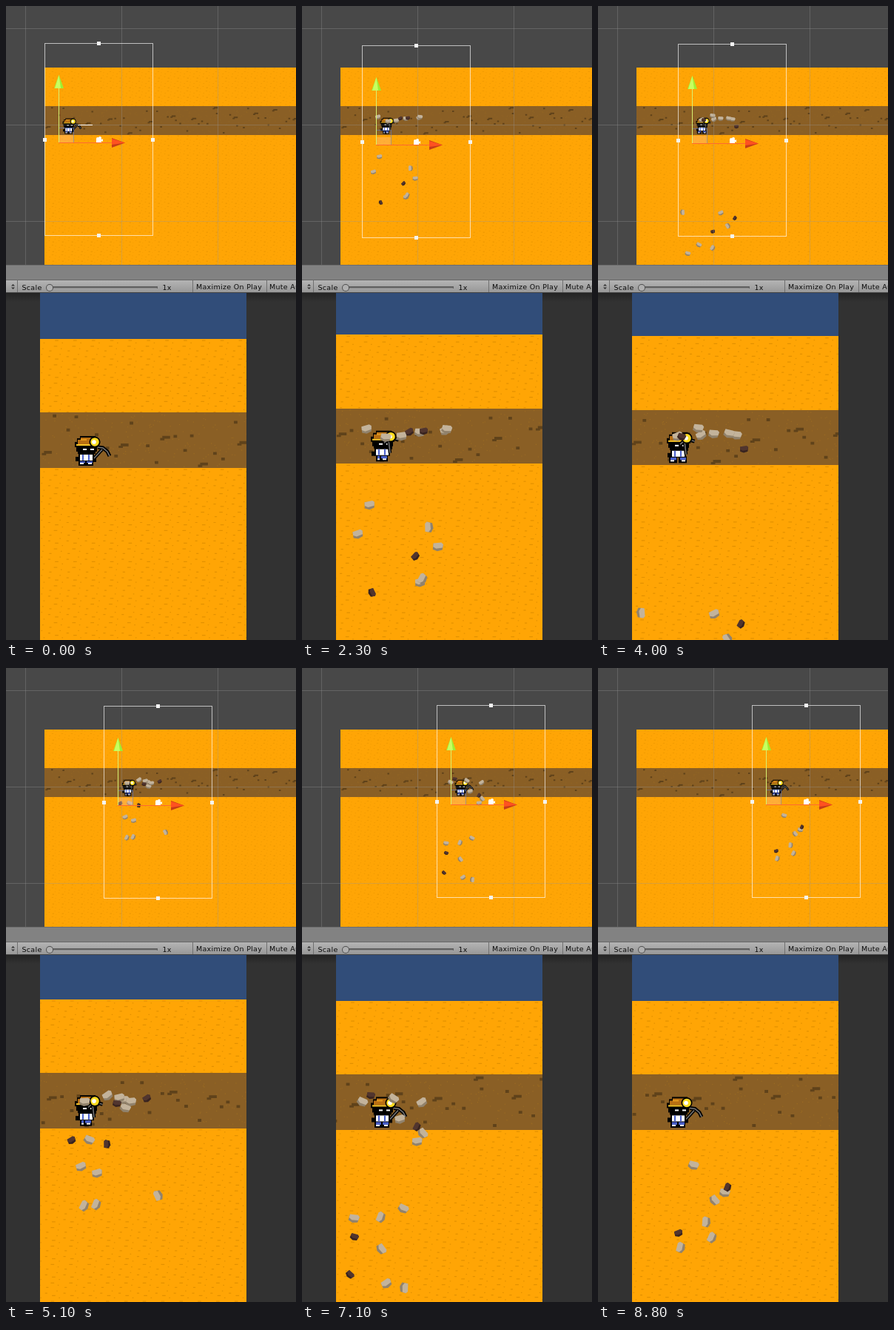
These frames come from a looping animation (392x855 px, 8900 ms). An HTML page with a canvas:

```html
<!DOCTYPE html>
<html>
<head>
<meta charset="utf-8">
<style>
html, body { margin: 0; width: 100%; height: 100%; overflow: hidden; background: #323232; }
canvas { display: block; }
</style>
</head>
<body>
<canvas id="stage" width="392" height="855"></canvas>
<script>
const ctx = document.getElementById('stage').getContext('2d');
const LOOP = 8900, FRAME = 100, ZOOM = 1.911, GRAVITY = 400;
const TILE = 13, LEFT = 52, TOP = 83, ROAD = 135, STEPS = 12;
const MOVING = 0.6; // share of each step spent walking, the rest is a pause

// time (s) and number of tiles walked
const pace = [[0, 0], [0.9, 0], [2.3, 2.14], [4, 4.18], [5.1, 6.1], [6.3, 8.1], [7.1, 9.85], [8.9, 12]];

let seed = 11;
const random = () => (seed = seed * 16807 % 2147483647) / 2147483647;
const between = (a, b) => a + (b - a) * random();

// Interpolates along the pace curve, in either direction
function follow(value, from, to) {
  const i = Math.max(1, pace.findIndex(p => p[from] > value));
  const a = pace[i - 1], b = pace[i];
  return a[to] + (b[to] - a[to]) * (value - a[from]) / (b[from] - a[from]);
}

function pose(t) {
  const phase = follow(t, 0, 1), step = Math.floor(phase), part = phase - step;
  const digging = t >= 0.9 && part < MOVING;
  return {
    digging,
    waiting: t < 0.9,
    x: LEFT + TILE * (step + Math.min(1, part / MOVING)),
    dip: digging ? 3 * Math.max(0, (7.3 - t) / 5) ** 1.1 : 0
  };
}

const pieces = [];
for (let step = 0; step < STEPS; step++) {
  for (let i = 0; i < 8; i++) {
    pieces.push({
      birth: follow(step, 1, 0) - 0.03,
      x: LEFT + step * TILE + between(28, 88), y: between(153, 162),
      vx: between(-30, 20), vy: between(-100, -20),
      angle: between(-0.5, 0.5), spin: between(-2, 2), dark: i > 5
    });
  }
}

const sandMarks = new Path2D(), spots = new Path2D(), speckles = new Path2D();
const px = TILE / 16;
for (let x = LEFT; x < 400; x += TILE)
  for (let y = TOP; y < 360; y += TILE)
    for (let i = 0; i < 7; i++)
      sandMarks.rect(x + (i * 5 + 3) % 16 * px, y + (i * 7 + 3) % 16 * px, (1 + i % 3) * px, px * 0.8);
for (let i = 0; i < 50; i++) {
  const x = LEFT + i * 7 + between(0, 5), y = ROAD + between(0, 36), wide = i % 4 == 0;
  spots.rect(x, y, wide ? 5.5 : 2.5, 2);
  if (wide) spots.rect(x - 1.5, y + 1.5, 3, 1.6);
}
for (let i = 0; i < 400; i++) speckles.rect(LEFT + random() * 340, ROAD + random() * 38, 0.6, 0.6);

function box(color, x, y, w, h) {
  ctx.fillStyle = color;
  ctx.fillRect(x, y, w, h);
}

function fill(color, path) {
  ctx.fillStyle = color;
  ctx.fill(path);
}

function shape(color, ...points) {
  ctx.fillStyle = color;
  ctx.beginPath();
  for (const [x, y] of points) ctx.lineTo(x, y);
  ctx.fill();
}

function line(color, width, ...points) {
  ctx.strokeStyle = color;
  ctx.lineWidth = width;
  ctx.beginPath();
  for (const [x, y] of points) ctx.lineTo(x, y);
  ctx.stroke();
}

function disc(color, x, y, r) {
  ctx.fillStyle = color;
  ctx.beginPath();
  ctx.arc(x, y, r, 0, 7);
  ctx.fill();
}

function shade(y, h, from, to) {
  const g = ctx.createLinearGradient(0, y, 0, y + h);
  g.addColorStop(0, from);
  g.addColorStop(1, to);
  box(g, 0, y, 392, h);
}

// Full-width layer whose edges land on whole pixels at any zoom
function layer(color, top, bottom) {
  const m = ctx.getTransform(), snap = y => (Math.round(y * m.d + m.f) - m.f) / m.d;
  box(color, LEFT, snap(top), 400, snap(bottom) - snap(top));
}

function pickaxe(raised) {
  ctx.save();
  ctx.translate(27, 31);
  if (raised) ctx.rotate(-0.85);
  const handle = [[0, 0], [11, -12]], head = [[5, -15], [12, -14], [18, -9], [21, -3]];
  line('#000', 4.5, ...handle);
  line('#000', 5, ...head);
  line('#777', 1.5, ...handle);
  line('#777', 1.5, ...head);
  ctx.restore();
}

function miner(t, { x, digging, waiting }) {
  const frame = Math.round(t * 10);
  const bob = waiting ? 1 - Math.cos(frame * 1.25) : 1.5;
  const stride = digging ? (frame % 4 < 2 ? 2 : -2) : 0;
  ctx.save();
  ctx.translate(x + 46 / ZOOM - 22 / ZOOM + 0.1 * 0 + 22 / ZOOM, 151);
  ctx.scale(1 / ZOOM, 1 / ZOOM);
  for (const [foot, toe] of [[7 - stride, -1], [16 + stride, 1]]) {
    box('#000', foot - 1, 32, 11, 9);
    box('#4a60cc', foot + 1, 33, 8, 4);
    box('#fff', foot + 2 + toe, 37, 5, 2);
  }
  ctx.translate(0, -bob);
  // torso and arms
  box('#000', 6, 23, 21, 12);
  box('#000', 2, 29, 5, 6);
  box('#000', 25, digging ? 18 : 28, 5, 8);
  box('#fff', 8, 26, 17, 8);
  for (const stripe of [11, 19]) box('#4a60cc', stripe, 26, 2, 8);
  // head and helmet, from wide to narrow
  box('#000', 3, 14, 28, 8);
  box('#000', 5, 20, 24, 5);
  box('#000', 1, 9, 32, 7);
  box('#000', 4, 4, 29, 8);
  box('#000', 8, 1, 21, 6);
  box('#b96f12', 5, 6, 21, 6);
  box('#b96f12', 9, 3, 16, 4);
  box('#e59a1c', 9, 5, 8, 2);
  box('#ffc928', 3, 12, 22, 2);
  for (const eye of [12, 22]) box('#fff', eye, 18, 5, 2);
  pickaxe(digging);
  disc('#000', 28, 9, 7.5);
  disc('#ffdc20', 28, 9, 5.8);
  disc('#fff', 27, 9, 2.8);
  ctx.restore();
}

function rock({ birth, x, y, vx, vy, angle, spin, dark }, t) {
  const d = t - birth;
  if (d < 0 || d > 1.6) return;
  ctx.save();
  ctx.translate(x + vx * d, y + vy * d + GRAVITY * d * d / 2);
  ctx.rotate(angle + spin * d);
  if (dark) ctx.scale(0.8, 0.8);
  shape(dark ? '#38231f' : '#91826c', [-3.5, -1.5], [3.5, -2], [3.4, 2], [0, 3.5], [-3.3, 2.6]);
  shape(dark ? '#51352e' : '#c3b39b', [-3.5, -1.7], [2, -3], [3.5, -2], [3.4, 0.5], [-1, 1.8], [-3.4, 0.8]);
  ctx.restore();
}

function world(t, player) {
  layer('#ffa505', TOP, 420);
  fill('#e39100', sandMarks);
  layer('#8a5f25', ROAD, 174);
  fill('#9b6b22', speckles);
  fill('#5f421a', spots);
  miner(t, player);
  for (const piece of pieces) rock(piece, t);
}

function clipped(x, y, w, h, paint) {
  ctx.save();
  ctx.beginPath();
  ctx.rect(x, y, w, h);
  ctx.clip();
  paint();
  ctx.restore();
}

function gizmos(player) {
  for (let i = 0; i < 3; i++) {
    box('rgba(150,150,150,.35)', 26 + i * 130, 0, 1, 349);
    box('rgba(150,150,150,.35)', 0, 30 + i * 130, 392, 1);
  }
  const x = Math.round(player.x), y = Math.floor(50 + player.dip);
  if (player.waiting) box('#fff', 97, 160, 20, 1);
  ctx.strokeStyle = 'rgba(255,255,255,.65)';
  ctx.lineWidth = 1;
  ctx.strokeRect(x + 0.5, y + 0.5, 146, 259);
  for (const [dx, dy] of [[73, 0], [73, 259], [0, 130], [146, 130]])
    box('#f4f4f4', x + dx - 2, y + dy - 2, 5, 5);
  // camera icon
  box('#fff', x + 70, y + 129, 7, 5);
  disc('#fff', x + 72, y + 129, 2);
  disc('#fff', x + 75, y + 128, 2);
  shape('#fff', [x + 76, y + 131], [x + 79, y + 129], [x + 79, y + 133]);
  // move handles
  ctx.save();
  ctx.translate(x + 19, y + 134);
  box('rgba(255,190,150,.35)', 0, -10, 20, 10);
  box('rgba(90,130,230,.5)', 0, -20, 20, 1);
  box('rgba(90,130,230,.5)', 20, -20, 1, 20);
  box('#d8f070', 0, -74, 1, 74);
  box('#ff6a30', 0, 0, 74, 1);
  shape('#9fee32', [0.5, -91], [7, -73], [-6, -73]);
  shape('#c8ff60', [0.5, -91], [3, -73], [-5, -73]);
  shape('#c83c18', [90, 0.5], [72, -6], [72, 7]);
  shape('#ff5220', [90, 0.5], [72, -5], [72, 3]);
  ctx.restore();
}

function toolbar() {
  box('#828282', 0, 349, 392, 21);
  box('#6c6c6c', 0, 349, 392, 1);
  shade(370, 16, '#b4b4b4', '#989898');
  box('#686868', 0, 369, 392, 1);
  box('#444', 0, 386, 392, 1);
  for (const x of [15, 252, 352]) box('#707070', x, 370, 1, 16);
  shape('#333', [7, 377.5], [12, 377.5], [9.5, 375]);
  shape('#333', [7, 379.5], [12, 379.5], [9.5, 382]);
  box('#606060', 63, 378, 142, 3);
  box('#8c8c8c', 64, 380, 140, 1);
  disc('#505050', 59, 380, 5);
  disc('#b0b0b0', 59, 380, 4);
  ctx.fillStyle = '#0c0c0c';
  ctx.font = '9.5px "DejaVu Sans", sans-serif';
  ctx.letterSpacing = '0.3px';
  ctx.fillText('Scale', 21.5, 383);
  ctx.fillText('1x', 211.5, 383);
  ctx.fillText('Maximize On Play', 257, 382);
  ctx.fillText('Mute Audio', 356, 382);
}

function draw(t) {
  const player = pose(t);
  box('#484848', 0, 0, 392, 349);
  clipped(0, 0, 392, 349, () => {
    world(t, player);
    gizmos(player);
  });
  box('#323232', 0, 387, 392, 468);
  shade(387, 12, '#242424', '#323232');
  box('#314d79', 46, 387, 279, 468);
  clipped(46, 387, 279, 468, () => {
    ctx.translate(46 - player.x * ZOOM, 449 - (TOP + player.dip) * ZOOM);
    ctx.scale(ZOOM, ZOOM);
    world(t, player);
  });
  toolbar();
}

const start = performance.now();
function tick() {
  const ms = (performance.now() - start) % LOOP;
  draw(Math.floor(ms / FRAME) * FRAME / 1000);
  requestAnimationFrame(tick);
}
tick();
</script>
</body>
</html>
```
